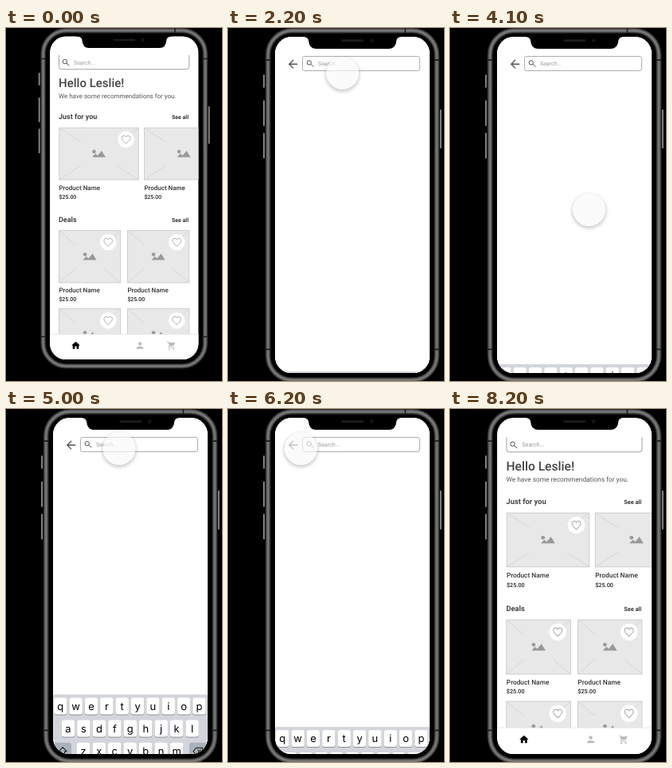
An HTML page for the animation above (8.8 s loop, 271x442 px).

```html
<!DOCTYPE html>
<html lang="en">
<head>
<meta charset="utf-8">
<title>Shop app prototype</title>
<style>
  html, body { margin: 0; width: 100%; height: 100%; overflow: hidden; background: #000; }
  svg { display: block; width: 271px; height: 442px; }
  text { font-family: Roboto, Arial, sans-serif; text-rendering: geometricPrecision; }
  #keys text { font-family: Inter, Roboto, sans-serif; text-anchor: middle; }
  #touch {
    position: absolute; left: -20.5px; top: -21.5px; width: 41px; height: 41px;
    border-radius: 50%; background: rgba(250, 250, 250, .68);
    box-shadow: 0 2px 4px 1px rgba(0, 0, 0, .2);
  }
</style>
</head>
<body>
<svg id="stage" viewBox="0 0 271 442"></svg>
<div id="touch"></div>
<script>
const LOOP = 8800, STEP = 100, ZOOM = 1.041, SHIFT = 1.7;

// ---------- drawing helpers ----------
const rect = (x, y, w, h, r, fill, more = '') =>
  `<rect x="${x}" y="${y}" width="${w}" height="${h}" rx="${r}" fill="${fill}" ${more}/>`;
const circle = (x, y, r, fill, more = '') =>
  `<circle cx="${x}" cy="${y}" r="${r}" fill="${fill}" ${more}/>`;
const text = (x, y, size, str, fill, weight = 400) =>
  `<text x="${x}" y="${y}" font-size="${size}" font-weight="${weight}" fill="${fill}">${str}</text>`;
const line = (d, color, width = 1) =>
  `<path d="${d}" fill="none" stroke="${color}" stroke-width="${width}" stroke-linecap="round" stroke-linejoin="round"/>`;
// 24-unit icon centred on x, y
const icon = (x, y, size, d, more) =>
  `<path transform="translate(${x - size / 2} ${y - size / 2}) scale(${size / 24})" d="${d}" ${more}/>`;

const HOME = 'M10 20v-6h4v6h5v-8h3L12 3 2 12h3v8z';
const PERSON = 'M12 12a4 4 0 1 0 0-8 4 4 0 0 0 0 8zm0 2c-2.7 0-8 1.3-8 4v2h16v-2c0-2.7-5.3-4-8-4z';
const CART = 'M1 2v2h2l3.6 7.6-1.4 2.4C4.5 15.5 5.5 17 7 17h12v-2H7.4l1.1-2h7.5c.7 0 1.4-.4 1.7-1L21.5 5H5.2L4.3 2zM7 18a2 2 0 1 0 0 4 2 2 0 0 0 0-4zm10 0a2 2 0 1 0 0 4 2 2 0 0 0 0-4z';
const HEART = 'M12 20.5C5 14.5 3 12 3 8.5A4.7 4.7 0 0 1 12 6.2 4.7 4.7 0 0 1 21 8.5C21 12 19 14.5 12 20.5z';
const LENS = 'M15 10a5.5 5.5 0 1 1-11 0 5.5 5.5 0 0 1 11 0zM14 14l7 7';
const BACK = 'M20 11H7.8l5.6-5.6L12 4l-8 8 8 8 1.4-1.4L7.8 13H20z';

const lens = (x, y) => icon(x, y, 11.5, LENS, 'fill="none" stroke="#444" stroke-width="2"');

function card(x, y, w, h, heart = true) {
  const r = x + w, b = y + h, dx = w * .27, dy = h * .27;
  const cx = x + w / 2, cy = y + h / 2 - .3;
  return rect(x, y, w, h, 0, '#e8e8e8', 'stroke="#c6c6c6" stroke-width=".8"') +
    line(`M${x} ${y}l${dx} ${dy}M${r} ${y}l${-dx} ${dy}M${x} ${b}l${dx} ${-dy}M${r} ${b}l${-dx} ${-dy}`, '#cfcfcf', .7) +
    circle(cx - 6, cy - 2.5, 2.3, '#999') +
    `<path d="M${cx - 8.5} ${cy + 4.5}l4-4.5 3 2.5 5-6 5 8z" fill="#999"/>` +
    (heart ? circle(r - 15.6, y + 14.6, 10.3, '#fff') +
      icon(r - 15.6, y + 14.8, 14, HEART, 'fill="none" stroke="#aaa" stroke-width="1.7"') : '');
}
const label = (x, y) =>
  text(x, y, 8, 'Product Name', '#333', 500) + text(x, y + 11.2, 7, '$25.00', '#222', 500);
const heading = (y, str) =>
  text(66, y, 9, str, '#444', 700) + text(208, y, 7, 'See all', '#333', 700);

function home() {
  return rect(53, 8, 190, 409, 0, '#fff') +
    line('M66.5 34.5V48.5Q66.5 51.7 69.7 51.7H226.6Q229.8 51.7 229.8 48.5V34.5', '#999', .9) +
    lens(75, 43) + text(85, 45.5, 7, 'Search...', '#999') +
    text(66, 74.3, 15, 'Hello Leslie!', '#444', 500) +
    text(66, 87.6, 8, 'We have some recommendations for you.', '#555') +
    heading(114.2, 'Just for you') +
    card(66.8, 125, 99.4, 65) + card(173.4, 125, 99.4, 65, false) +
    label(66.5, 202.8) + label(173.4, 202.8) +
    heading(243.2, 'Deals') +
    [66.4, 152.4].map(x => card(x, 253.6, 77.4, 65.4) + label(x, 331.2) + card(x, 351.6, 77.4, 65.4)).join('') +
    rect(53, 383.5, 190, 34, 0, '#fff') + line('M53 383.5H243', '#e4e4e4', .8) +
    icon(87.5, 397.5, 13, HOME, 'fill="#000"') +
    icon(168, 397.5, 13, PERSON, 'fill="#bbb"') +
    icon(207.5, 397.5, 12.5, CART, 'fill="#bbb"');
}

function search() {
  return rect(50, 0, 210, 440, 0, '#fff') +
    icon(81.5, 45.2, 17, BACK, 'fill="#555"') +
    rect(93.5, 35.5, 147, 18, 2.6, '#fff', 'stroke="#a4a4a4" stroke-width=".9"') +
    lens(103, 44.3) + text(113, 46.7, 7, 'Search...', '#999');
}

function key(x, y, w, str = '', size = 13, fill = '#fff', ink = '#000') {
  return rect(x, y + 1, w, 21, 3, '#8c9096') + rect(x, y, w, 21, 3, fill) +
    text(x + w / 2, y + 10.7 + size * .34, size, str, ink);
}
function keyboard() {
  const row = (letters, x, y, gap) =>
    [...letters].map((c, i) => key(x + i * gap - 8.2, y, 16.4, c)).join('');
  const gray = '#abb1bb';
  return rect(50, 282, 210, 160, 0, '#d2d5db') +
    row('qwertyuiop', 68.3, 286, 19.35) +
    row('asdfghjkl', 78, 314, 19.45) +
    row('zxcvbnm', 97.2, 342.3, 19.5) +
    key(60.4, 342.3, 21.6, '', 8, gray) + key(230, 342.3, 21.8, '', 8, gray) +
    line('M71.2 348L66.3 353.2H68.8V357.2H73.6V353.2H76.100Z', '#111', 1) +
    line('M235 353L238.5 348.8H246.5V357.2H238.5ZM240.5 351L244.5 355M244.5 351L240.5 355', '#111', 1) +
    key(60.4, 370.3, 44.4, '123', 8, gray) + key(109, 370.3, 87, 'space', 8) +
    key(199.8, 370.3, 15.6, '.', 12) + key(218.6, 370.3, 33.2, 'Go', 8, '#007aff', '#fff') +
    circle(78.7, 412, 6.2, 'none', 'stroke="#444" stroke-width="1"') +
    circle(76.5, 410.3, .9, '#444') + circle(80.9, 410.3, .9, '#444') +
    line('M75 413.3Q78.700 419 82.4 413.3Z', '#444', .9) +
    rect(231.1, 405.5, 4, 8.4, 2, 'none', 'stroke="#444" stroke-width="1"') +
    line('M228.8 411V412Q229 416 233.1 416Q237.2 416 237.4 412V411M233.1 416V419', '#444', 1) +
    rect(121, 426.2, 70, 2.3, 1.1, '#000');
}

// Metal rim: strokes of falling width and rising brightness on one outline.
function body() {
  const button = (x, y, h) => rect(x, y, 1.8, h, .8, '#8c8c8c');
  const rim = (width, color) =>
    rect(46.6, 3.2, 203.4, 420.2, 29, 'none', `stroke="${color}" stroke-width="${width}"`);
  return button(40.8, 56, 16) + button(40.8, 87, 31) + button(40.8, 126, 31) + button(253.8, 98, 47) +
    rim(6.4, '#2c2c2c') + rim(4.8, '#4a4a4a') + rim(3, '#686868') + rim(1.3, '#7c7c7c') +
    line('M43.5 38.5H49.5M247 38.5H253M43.5 386.5H49.5M247 386.5H253M212 .5V6', '#1c1c1c', 1.6);
}
const notch =
  '<path d="M88 8V10.5Q95 10.500 95.4 15Q96.200 25 104 25H192.5Q200.600 25 201.4 15Q201.800 10.500 208.500 10.500V8Z" fill="#000"/>' +
  rect(135, 13.7, 27, 2.6, 1.3, '#1d1d1d') + circle(171.5, 15, 2.2, '#15151f');

document.getElementById('stage').innerHTML =
  `<clipPath id="screen">${rect(55.1, 10.6, 186.3, 404.4, 20, '#fff')}</clipPath>
   <g id="phone">${body()}
     <g clip-path="url(#screen)">${home()}
       <g transform="scale(${1 / ZOOM}) translate(${-SHIFT} 0)">
         <g id="search">${search()}</g><g id="keys">${keyboard()}</g>
       </g>
     </g>${notch}
   </g>`;

// ---------- motion ----------
const [phone, searchPage, keys, touch] =
  ['phone', 'search', 'keys', 'touch'].map(id => document.getElementById(id));

// time, x, y
const PATH = [
  [900, 164, 393], [1200, 146, 230], [1500, 126, 60], [1700, 128, 44], [1800, 139, 44],
  [2100, 142, 47], [2400, 146, 90], [2700, 153, 174], [3300, 176, 231], [4000, 176, 231],
  [4100, 174, 228], [4400, 158, 100], [4650, 145, 46], [4900, 142, 45], [5300, 139, 88],
  [5600, 126, 108], [5950, 98, 62], [6200, 91, 50], [6500, 86, 55], [7100, 86, 57],
  [7350, 86, 57], [7800, 128, 260], [8150, 176, 420]
];

const ramp = (t, a, b) => Math.min(1, Math.max(0, (t - a) / (b - a)));
const ease = u => u < .5 ? 2 * u * u : 1 - 2 * (1 - u) ** 2;
const slide = (t, a, b) => ease(ramp(t, a, b));

// Slope through a point; zero at turns and rests so nothing overshoots.
function slope(i, k) {
  const p = PATH[i - 1], q = PATH[i], r = PATH[i + 1];
  if (!p || !r || (q[k] - p[k]) * (r[k] - q[k]) <= 0) return 0;
  return (r[k] - p[k]) / (r[0] - p[0]);
}
function along(t, k) {
  const end = PATH.length - 1;
  if (t <= PATH[0][0]) return PATH[0][k];
  if (t >= PATH[end][0]) return PATH[end][k];
  const i = PATH.findIndex(p => p[0] > t) - 1;
  const a = PATH[i], b = PATH[i + 1], d = b[0] - a[0], u = (t - a[0]) / d;
  const s = u * u * (3 - 2 * u);
  return a[k] * (1 - s) + b[k] * s +
    d * u * (1 - u) * (slope(i, k) * (1 - u) - slope(i + 1, k) * u);
}

function draw(now) {
  const t = Math.floor(now % LOOP / STEP) * STEP;
  const z = slide(t, 1850, 2200);
  phone.setAttribute('transform', `translate(${SHIFT * z} 0) scale(${1 + (ZOOM - 1) * z})`);
  searchPage.setAttribute('opacity', slide(t, 1900, 2200) - slide(t, 6400, 6800));
  const up = slide(t, 2150, 2650) - slide(t, 3700, 4200) + slide(t, 4750, 5250) - slide(t, 5870, 6370);
  keys.setAttribute('transform', `translate(0 ${151 * (1 - up)})`);
  touch.style.transform = `translate(${along(t, 1)}px, ${along(t, 2)}px)`;
  touch.style.opacity = ramp(t, 820, 980) - ramp(t, 8020, 8200);
}

const start = performance.now();
function tick() {
  draw(performance.now() - start);
  requestAnimationFrame(tick);
}
tick();
</script>
</body>
</html>
```
